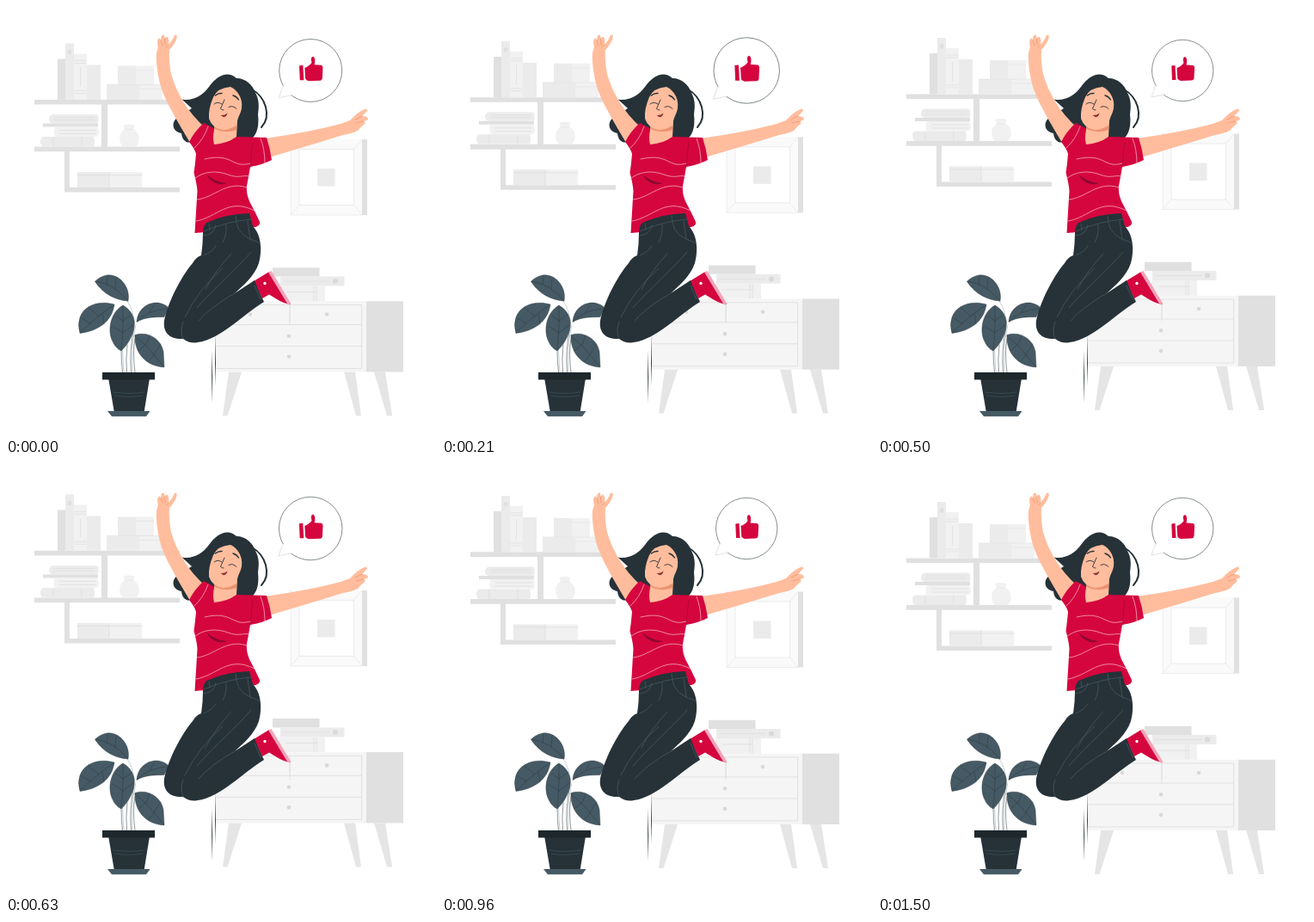
Write an HTML page that moves like this. It is 500x500 px and loops after 1540 ms.

```html
<!DOCTYPE html>
<html lang="en">
<head>
<meta charset="utf-8">
<title>Jump for joy</title>
<style>
  html, body { margin: 0; width: 100%; height: 100%; overflow: hidden; background: #fff; }
  svg { display: block; width: 100vw; height: 100vh; }
  .line { fill: none; stroke-linecap: round; stroke-linejoin: round; }
  .g1 { fill: #e0e0e0; } .g2 { fill: #ebebeb; } .g3 { fill: #f1f1f1; } .g4 { fill: #f5f5f5; }
  .dark { fill: #263238; } .slate { fill: #455a64; } .skin { fill: #ffbd9d; } .red { fill: #d5063e; }
</style>
</head>
<body>
<svg viewBox="0 0 500 500">
  <rect width="500" height="500" fill="#fff"/>

  <g id="room">
    <!-- shelves -->
    <path class="g1" d="M33 109.400H202V115H118V164H202V169.800H74V211.500H202V217H68V169.800H33V164H111V115H33Z"/>
    <path class="g1" d="M60 62H69V109.400H60Z"/>
    <path class="g2" d="M69 44H79V109.400H69ZM94 69H110V109.400H94Z"/>
    <path class="g3" d="M79 56H94V109.400H79Z"/>
    <circle class="g1" cx="74" cy="54" r="2.700"/>
    <path class="line" stroke="#e0e0e0" stroke-width=".8" d="M80 64H93M80 67H93M80 99H93M80 102H93M86.500 72V94"/>
    <path class="g2" d="M117 92H155V109.400H117ZM130 70H151V92H130Z"/>
    <path class="g3" d="M155 92H182V109.400H155ZM151 70H172V92H151Z"/>
    <path class="line" stroke="#e2e2e2" stroke-width=".7" d="M117 92H182M151 75H172M155 97H182"/>
    <path class="g2" d="M54 126.500H105Q107.500 127 107.500 130V134Q107.500 137 105 137H54Q50 136 50 132T54 126.500Z"/>
    <path class="g1" d="M43 137H107V141H43Z"/>
    <path class="g3" d="M57 141H105Q108 142 108 147T105 152.500H57Q54 147 57 141Z"/>
    <path class="g2" d="M43 152.500H102Q104 158 102 164H43Q40 162 40 158T43 152.500Z"/>
    <path class="line" stroke="#dedede" stroke-width=".8" d="M56 130H103M56 133H103M62 145H104M62 149H104M55 153V163M88 153V163"/>
    <path class="g3" d="M136.500 139Q143 137 149.500 139L148 144C156 147 157 159 151 164H136C130 159 131 147 138 144Z"/>
    <path class="line" stroke="#e5e5e5" stroke-width=".8" d="M138 144H148"/>
    <path class="g2" d="M83 193.500H120V211.500H83Z"/>
    <path class="g3" d="M120 193.500H158V211.500H120Z"/>
    <path class="line" stroke="#dedede" stroke-width=".8" d="M83 197H158M120 194V211"/>

    <!-- framed picture -->
    <path fill="#fafafa" d="M331 155.500H414V243.500H331Z"/>
    <path class="g1" d="M414 155.500H420V243.500H414Z"/>
    <path fill="#fff" stroke="#e3e3e3" stroke-width=".7" d="M341 167H404.500V232H341Z"/>
    <path class="line" stroke="#e3e3e3" stroke-width=".6" d="M331 155.500L341 167M414 155.500L404.500 167M331 243.500L341 232M414 243.500L404.500 232M331 155.500V243.500H414"/>
    <path class="g2" d="M362 189.500H382.500V210H362Z"/>

    <!-- cabinet -->
    <path fill="#e5e5e5" d="M259 426H274L257.500 477H252ZM393 426H406L413 477H407ZM428 426H441L449 477H443Z"/>
    <path class="g4" d="M243 343.700H419V426H243Z"/>
    <path class="g1" d="M419 343.700H462V426H419Z"/>
    <path class="line" stroke="#dcdcdc" stroke-width=".8" d="M244 348H413.500V422H244ZM244 371H413.500M244 396H413.500M330 348V371"/>
    <g fill="#d9d9d9">
      <circle cx="284" cy="359" r="2.300"/><circle cx="373" cy="359" r="2.300"/>
      <circle cx="329" cy="384.300" r="2.300"/><circle cx="329" cy="408" r="2.300"/>
    </g>
    <path class="g1" d="M310 304.700H364.500V315H310Z"/>
    <path class="g2" d="M319 315H393.500V326H319Z"/>
    <path class="g3" d="M318 326H371V343.700H318Z"/>
    <circle fill="#d9d9d9" cx="383" cy="320.500" r="3"/>
    <path class="line" stroke="#dedede" stroke-width=".8" d="M323 320.500H376M326 333H362M358 326.500V343M361 326.500V343"/>
  </g>

  <g id="bubble">
    <circle cx="354.200" cy="75" r="35.700" fill="#fff" stroke="#263238" stroke-width=".55"/>
    <path fill="#fff" stroke="#b8b8b8" stroke-width=".4" d="M323 92L318 106L333 103"/>
    <path class="red" d="M341.300 69.500L345.500 69L346.500 86H342ZM347.500 72Q353 70 355.500 66Q353.500 60 357 59Q360.500 61 358.500 68.500L366.500 69Q368.500 70 368 74L367.500 84Q367 86.500 364 86.500L352 87Q349.500 86 348.300 84.500Z"/>
  </g>

  <!-- plant -->
  <g class="line" stroke-width=".5">
    <path stroke="#263238" d="M134 400Q134 414 135.500 426M141 394Q139 412 140.500 426M149 373Q143 402 145.500 426M150 387Q147 404 150 426"/>
    <path stroke="#90a4ae" d="M135.500 400Q136 414 137 426M150.500 372Q145 402 147 426M141 343Q148 353 150 372"/>
  </g>
  <g class="slate" stroke="#263238" stroke-width=".4">
    <path d="M142 343C145 327 132 311 117 313Q108 315 103.500 320.500C114 336 128 342 142 343Z"/>
    <path d="M126 347C108 342 91 348 86 362Q83 371 86 380.500C106 378 123 368 126 347Z"/>
    <path d="M152 367.500C153 352 166 343 179 345.500Q186 347 189 351L184 361.500C175 362 162 361 152 367.500Z"/>
    <path d="M150 382.500C164 378 180 386 183 402L184 420C164 419 149 405 150 382.500Z"/>
    <path d="M136 348C122 356 118 375 123 388Q127 398 134 401C146 390 152 372 148 362Q145 353 136 348Z"/>
    <path class="line" d="M142 343Q126 323 104 320M125 348Q109 358 86 380M136 349Q137 374 134 400M152 367Q164 354 186 352M150 384Q164 394 183 419M127 329L128 317M117 324L118 315M108 361L96 351M98 369L88 363M112 358L114 370M136 366L128 360M136 366L146 359M136 380L124 372M136 380L148 371M163 394L167 383M172 405L180 393M162 394L154 401M172 406L166 413M167 356L172 348"/>
  </g>
  <path class="dark" d="M119.300 434H166.800L160.700 471.500H125.700Z"/>
  <path fill="#1d272c" d="M112 426H173V434.500H112Z"/>
  <path class="slate" d="M118 471H167.500L163 477.300H123Z"/>
  <path class="line" stroke="#455a64" stroke-width=".6" d="M125 449Q143 452 161 449M127 453Q143 456 159 453"/>

  <!-- motion lines -->
  <path class="dark" d="M239.400 400L240.200 432L239.800 462L239.200 432ZM243 384L243.900 415L243.400 442L243 415Z"/>
  <path class="line" stroke="#d4d4d4" stroke-width=".5" d="M330 347V367"/>

  <!-- hair -->
  <path class="dark" d="M204.500 108.500C217 111 229 104 236 94C246 80 258 75 268 84C279 84 287 92 290 101C295 110 294 118 293 126Q295 145 287 153L240 158L222 153C216 162 205 160 204 148C193 146 192 135 199 130L216 119Z"/>
  <path class="line" stroke="#263238" stroke-width="2" d="M286 97C302 106 309 128 297 141"/>

  <!-- arms -->
  <path class="skin" d="M214 159C203 140 189 118 181 97C177 84 174 67 175 54L177 48Q175 41 177 38.500Q179 36 180 40Q180 34 182.500 33.500Q184.500 33 184.500 38Q187 34 188.500 37Q190 40 189 45Q193 41 195 36Q196 32.500 198.500 34Q199.500 37 196 43Q193 48 190 51Q189 65 192 79C198 101 212 124 231 141Z"/>
  <path class="skin" d="M301 154Q352 147 389 137L400 133Q409 123 418 119.500Q422 120 418 124L414 128Q420 128 421 131Q421 133 416 134Q419 136 416 138Q412 141 409 145Q403 148 392 150Q350 163 306 176Z"/>
  <path class="line" stroke="#e58d68" stroke-width=".6" d="M180 40L182 46M184.500 38L185 45M189 45L186 48M414 128L406 132M416 134L407 136"/>

  <!-- shirt -->
  <path class="red" d="M230 136Q219 146 213 158Q220 167 221 172Q220 184 218.500 194Q222 207 222.500 215L219.500 264L231 263L290 257Q296 255 295 251Q290 240 283 227Q279 217 280 209Q282 199 284 187Q300 184 309 179Q307 165 303 153L268 152L243 143Z"/>
  <path fill="#8e0830" d="M233 196Q244 205 257 206Q242 211 233 196Z"/>
  <g class="line" stroke="#f7a9bd" stroke-width=".8">
    <path d="M231 178C248 174 256 177 264 181S276 185 284.500 183M219 201C229 192 245 191 258 196S276 196 282 198M222.500 225C242 223 256 203 280 211M221 250C246 246 258 222 289 238M235 140Q230 155 219 165M296 154Q301 167 301 182"/>
  </g>
  <path class="line" stroke="#a60734" stroke-width=".7" d="M287 159Q285 172 284 187"/>

  <!-- head -->
  <path class="skin" d="M243 136L242 144Q240 153 242 161Q257 160 268 152L269 134Z"/>
  <path fill="#ee9270" d="M242 140Q254 147 268 139L268 144Q254 149 243 143Z"/>
  <path class="skin" d="M261 94Q246 95 241 106Q235 120 236 131Q240 143 253 144Q264 143 268 137Q270 129 273 123Q276 114 272 105Q268 97 261 94Z"/>
  <g class="line" stroke="#263238" stroke-width=".9">
    <path d="M242 114Q246 110.500 251 114M259 117.500Q264 115 268 119.500M254 109L249.500 119.500Q251 121 253 121"/>
    <path stroke-width="1.400" d="M243.500 104Q247 101 251 101.500M264 104Q268 105 270.500 109"/>
  </g>
  <path fill="#8e3035" d="M249.500 127Q254 127.500 257.500 124.500Q256 130 252.500 129Z"/>

  <!-- shoe -->
  <path class="red" d="M288 320L306 309L331 347Q323 346 315 341L306 335.500L298 340Z"/>
  <path fill="#f4a4b9" d="M305 309.500L308.500 308L331 345.500L330 347.500L327 346Z"/>
  <circle cx="301" cy="322.500" r="1.700" fill="#fff"/>

  <!-- jeans -->
  <path class="dark" d="M229 264Q229 256 233 252Q256 241.500 283 241L287 256C297 266 298 285 294 299C289 314 276 325 266 334L289 319Q293 330 300 344C275 359 249 388 223 391Q214 393 206 387C192 388 182 381 184 366C188 345 204 314 217 299Q221 292 227 290Q229 276 229 264Z"/>
  <g class="line" stroke="#4f646e" stroke-width=".6">
    <path d="M230 262Q258 250 285 248M236 253L237 260M267 244L268 251M268 252Q270 268 294 275M230 267Q242 266 244 255M256 254Q257 266 252 275M281 250L284 271M285 286C268 306 244 326 222 351M266 334Q239 349 224 366M262 288Q241 311 232 330M252 305Q224 329 208 362M206 387Q202 378 206 367M289 325L296 341M230 290Q240 286 244 279"/>
  </g>
</svg>

<script>
  const LOOP = 1540, FRAMES = 37, CYCLE = 1500;
  const room = document.getElementById('room');
  const bubble = document.getElementById('bubble');

  // [phase, value] steps with straight runs between them
  const float = [[0, 0], [.5, -10], [1, 0]];
  const beat = [[0, 1], [.1, 1.1], [.3, 1], [.4, 1], [.5, 1.1], [.6, 1], [1, 1]];

  function at(steps, p) {
    const i = Math.max(1, steps.findIndex(s => s[0] >= p));
    const [p0, v0] = steps[i - 1], [p1, v1] = steps[i];
    return v0 + (v1 - v0) * (p - p0) / (p1 - p0);
  }

  function draw(ms) {
    const k = Math.floor(((ms + 4) % LOOP) * FRAMES / LOOP);
    const p = Math.min(1, (33 + k * 40.75) / CYCLE);
    room.setAttribute('transform', `translate(0 ${at(float, p)})`);
    bubble.setAttribute('transform', `translate(354.2 75) scale(${at(beat, p)}) translate(-354.2 -75)`);
  }

  const start = performance.now();
  function tick() {
    draw(performance.now() - start);
    requestAnimationFrame(tick);
  }
  tick();
</script>
</body>
</html>
```
